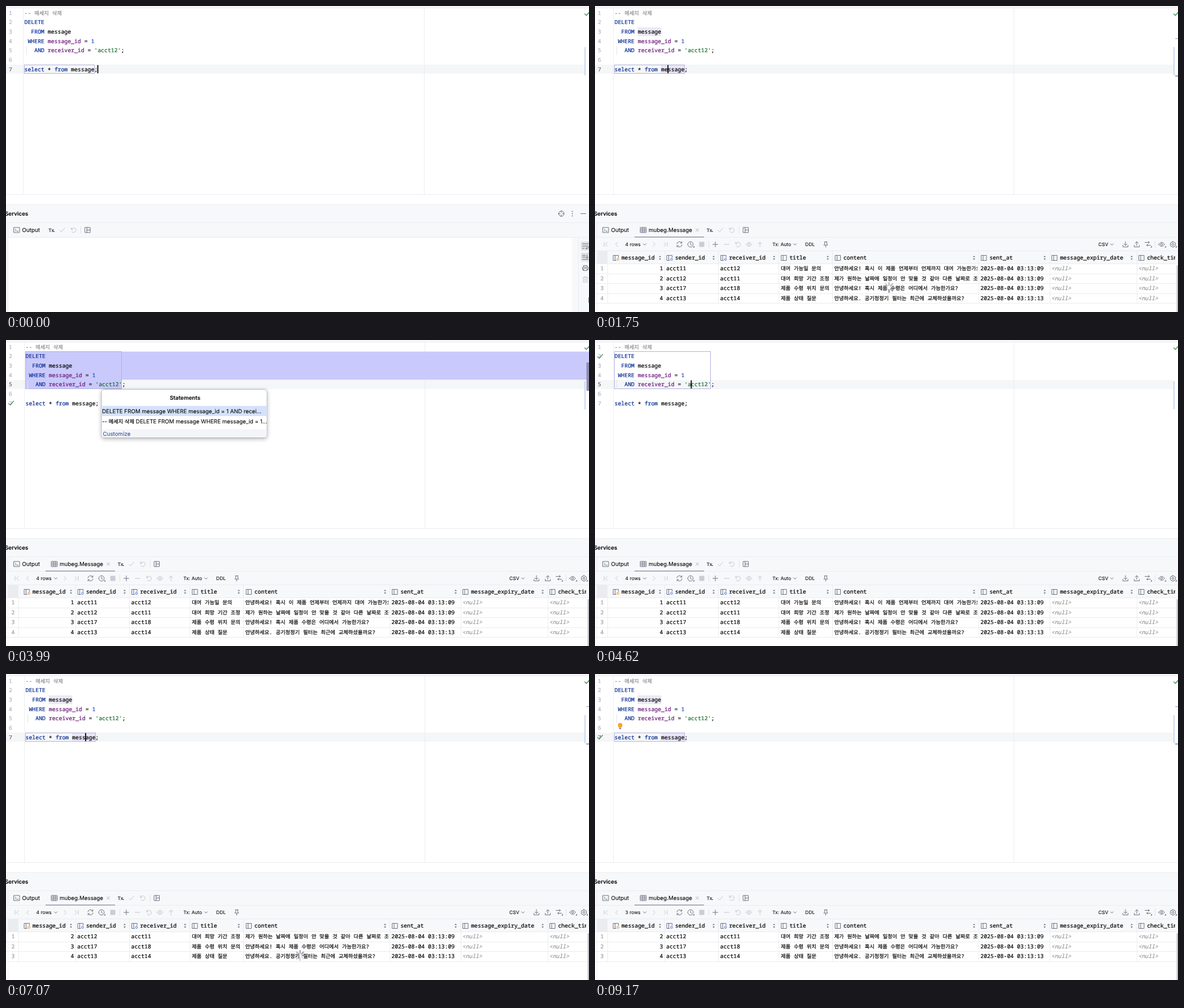
Animation, 1032 px wide and 543 px high, one loop 9590 ms. Source, as an HTML page:

```html
<!DOCTYPE html>
<html lang="ko">
<head>
<meta charset="utf-8">
<title>Query console</title>
<style>
html, body { margin: 0; width: 100%; height: 100%; overflow: hidden; background: #fff; }
svg { display: block; width: 1032px; height: 543px; }
text { font: 9.8px Inter, sans-serif; text-rendering: geometricPrecision; white-space: pre; stroke-width: .08; }
.m { font: 9.82px "Noto Sans Mono", "DejaVu Sans Mono", monospace; stroke-width: .24; }
.k { font: 9.25px "Noto Sans Mono", "Noto Sans CJK KR", "Noto Sans CJK", monospace; word-spacing: .34px; stroke-width: .22; }
.s { font-size: 8.5px; }
.b { font-weight: 600; }
.i { font-style: italic; stroke-width: .1; }
.ic { fill: none; stroke: #6c707e; stroke-width: 1; stroke-linecap: round; stroke-linejoin: round; }
.off { stroke: #c3c6cf; }
</style>
</head>
<body>
<svg id="stage" viewBox="0 0 1032 543"></svg>
<script>
const LOOP = 9590, CW = 5.892, X0 = 32.6, PITCH = 16.65;
const GRAY = '#f7f8fa', RULE = '#ebecf0', INK = '#080808';
const KEY = '#0a3095', FIELD = '#6e1a7c', STR = '#14702a', NUM = '#1a49c4';

const text = (x, y, s, cls = '', fill = INK, more = '') =>
  `<text x="${x}" y="${y}" class="${cls}" fill="${fill}" stroke="${fill}" ${more}>${s}</text>`;
const rect = (x, y, w, h, fill, more = '') =>
  `<rect x="${x}" y="${y}" width="${w}" height="${h}" fill="${fill}" ${more}/>`;
const icon = (x, y, d, cls = '', more = '') =>
  `<path class="ic ${cls}" transform="translate(${x} ${y})" d="${d}" ${more}/>`;
const group = (id, body, more = '') => `<g id="${id}" ${more}>${body}</g>`;
const ring = r => `M${-r} 0a${r} ${r} 0 1 0 ${2 * r} 0a${r} ${r} 0 1 0 ${-2 * r} 0`;
const base = n => 15.7 + (n - 1) * PITCH;
const code = (n, col, s, fill) => text(X0 + col * CW, base(n), s, 'm', fill);

const D = {
  check: 'M-4.5 0.5L-1.5 3.5L4.5 -3.5',
  undo: 'M-4 -4V-1H-1M-3.7 -1.2A4.2 4.2 0 1 1 -3 3',
  down: 'M-2.5 -1.2L0 1.3L2.5 -1.2',
  left: 'M2 -3.5L-1.5 0L2 3.5',
  right: 'M-2 -3.5L1.5 0L-2 3.5',
  plus: 'M-4.5 0H4.5M0 -4.5V4.5',
  minus: 'M-4.5 0H4.5',
  panes: 'M-4.5 -4.5H4.5V4.5H-4.5ZM-1.3 -4.5V4.5M-1.3 0H4.5',
  table: 'M-5 -4.5H5V4.5H-5ZM-5 -1.5H5M-1.7 -4.5V4.5M1.7 -4.5V4.5M-5 1.5H5',
  refresh: 'M-4.6 -.8A4.7 4.7 0 0 1 4 -2.5M4.3 -4.8V-2.2H1.8M4.6 .8A4.7 4.7 0 0 1 -4 2.5M-4.3 4.8V2.2H-1.8',
  clock: ring(4.8) + 'M0 -2.8V.3L2 1.5',
  eye: 'M-5.2 0Q0 -7.5 5.2 0Q0 7.5 -5.2 0Z' + ring(1.7),
  up: 'M0 4.5V-4M-3.5 -.8L0 -4.2L3.5 -.8',
  pin: 'M-2.5 -4.5H2.5M-1.8 -4.5V-1L-3.5 1.2H3.5L1.8 -1V-4.5M0 1.2V5',
  load: 'M0 -5V1.8M-2.8 -.8L0 1.8L2.8 -.8M-4.5 1.5V4.5H4.5V1.5',
  send: 'M0 2V-4.8M-2.8 -2L0 -4.8L2.8 -2M-4.5 1.5V4.5H4.5V1.5',
  compare: 'M-5 -3.5H3M1 -5.2L3 -3.5L1 -1.8M5 1.5H-2M0 -.2L-2 1.5L0 3.2',
  gear: ring(1.8) + 'M-1 -5H1L1.7 -3.4L3.6 -3.3L4.9 -1L4 0L4.9 1L3.6 3.3L1.7 3.4L1 5H-1L-1.7 3.4L-3.6 3.3L-4.9 1L-4 0L-4.9 -1L-3.6 -3.3L-1.7 -3.4Z',
  target: ring(4.8) + 'M0 -4.8V-2M0 4.8V2M-4.8 0H-2M4.8 0H2',
  wrap: 'M-5 -4H5M-5 0H3.5A2 2 0 0 1 3.5 4H1M2.5 2.4L1 4L2.5 5.6M-5 4H-2',
  toEnd: 'M-5 -3H0M-5 0H0M-5 4H5M3 -4V2M1 0L3 2L5 0',
  printer: 'M-3 -1.5V-4.5H3V-1.5M-3 3H-5V-1.5H5V3H3M-3 1H3V4.5H-3Z',
  trash: 'M-4.5 -3H4.5M-1.5 -3V-4.8H1.5V-3M-3.5 -3V5H3.5V-3M-1.2 -.5V2.8M1.2 -.5V2.8',
};

const keys = [0, 1, 2, 3, 4, 5, 6, 7];
const COLS = [
  ['message_id', 32, 115], ['sender_id', 127, 210], ['receiver_id', 222.5, 317], ['title', 329.5, 412],
  ['content', 425, 671], ['sent_at', 683.5, 796], ['message_expiry_date', 808.5, 950], ['check_time', 962.5, 0],
];
const ROWS = [
  [1, 'acct11', 'acct12', '대여 가능일 문의', '안녕하세요! 혹시 이 제품 언제부터 언제까지 대여 가능한가요?', '09'],
  [2, 'acct12', 'acct11', '대여 희망 기간 조정', '제가 원하는 날짜에 일정이 안 맞을 것 같아 다른 날짜로 조정', '09'],
  [3, 'acct17', 'acct18', '제품 수령 위치 문의', '안녕하세요! 혹시 제품 수령은 어디에서 가능한가요?', '09'],
  [4, 'acct13', 'acct14', '제품 상태 질문', '안녕하세요. 공기청정기 필터는 최근에 교체하셨을까요?', '13'],
];

function gridRows(list) {
  return list.map((r, i) => {
    const y = 469.4 + i * 17.4, nul = x => text(x, y, '&lt;null&gt;', 'm i', '#8c8c8c');
    return rect(0, Math.round(475 + i * 17.4), 1029, 1, RULE) +
      [22, 123, 218, 325, 420, 679, 805, 959].map(x => rect(x, 458, 1, 17.4 * (i + 1), RULE)).join('') +
      text(9.5, y, i + 1, 'm', '#9a9eaa') +
      text(120.5, y, r[0], 'm', INK, 'text-anchor="end"') +
      text(126, y, r[1], 'm') + text(221.5, y, r[2], 'm') +
      text(329, y, r[3], 'k') + text(423.5, y, r[4], 'k', INK, 'clip-path="url(#cell)"') +
      text(682.3, y, '2025-08-04 03:13:' + r[5], 'm') + nul(807.5) + nul(961.5);
  }).join('');
}

function header() {
  return COLS.map(([name, x, sort], i) => {
    const d = 'M.5 -4.5H9.5V4.5H.5ZM3.5 -4.5V4.5';
    const mark = i < 3 ? rect(x + 5.5, 446.5, 6, 6, GRAY) +
      `<circle cx="${x + 8.5}" cy="449.5" r="1.8" fill="none" stroke="${i ? '#3574f0' : '#e08b2c'}"/>` : '';
    const arrows = sort ? `<path fill="#6c707e" d="M${sort - 2} 445.5l2 -2.5l2 2.5zM${sort - 2} 448l2 2.5l2 -2.5z"/>` : '';
    return icon(x, 447, d) + mark + text(x + 14.7, 450, name, 'm', INK, 'clip-path="url(#head)"') + arrows;
  }).join('');
}

function gridBar() {
  const y = 423;
  return icon(20, y, D.left + 'M-4 -3.5V3.5', 'off') + icon(38, y, D.left, 'off') + icon(88, y, D.down) +
    icon(105, y, D.right, 'off') + icon(124, y, D.right + 'M4 -3.5V3.5', 'off') +
    icon(149.5, y, D.refresh) + icon(169, y, D.clock) + '<path d="M176 425.5v3h-3z" fill="#6c707e"/>' +
    rect(184.5, 418.5, 9, 9, '#c9ccd6', 'rx="1"') + rect(201, 417, 1, 12, '#dfe1e5') +
    icon(213, y, D.plus) + icon(233, y, D.minus, 'off') + icon(253, y, D.undo, 'off') +
    icon(272.5, y, D.eye, 'off') + icon(292, y, D.up, 'off') +
    text(314, 426, 'Tx: Auto', 's') + icon(354, y, D.down) + text(372, 426, 'DDL', 's') + icon(408.5, y, D.pin) +
    text(891, 426, 'CSV', 's') + icon(915, y, D.down) + icon(939, y, D.load) + icon(959, y, D.send) +
    icon(978.5, y, D.compare) + rect(991, 417, 1, 12, '#dfe1e5') + icon(1003, y, D.eye) + icon(1023, y, D.gear) +
    '<path d="M986 425.5v3h-3zM1011 425.5v3h-3zM1030 425.5v3h-3z" fill="#6c707e"/>';
}

function editor() {
  const guide = rect(X0 + 3.4, 71, 1, 16, '#e3e4e8');
  return rect(30, 3, 1, 331, RULE) + guide +
    code(1, 0, '--', '#8c8c8c') + text(X0 + 3 * CW, base(1), '메세지 삭제', 'k', '#8c8c8c') +
    code(2, 0, 'DELETE', KEY) + code(3, 2, 'FROM', KEY) + code(3, 7, 'message', INK) +
    code(4, 1, 'WHERE', KEY) + code(4, 7, 'message_id', FIELD) + code(4, 18, '=', INK) + code(4, 20, '1', NUM) +
    code(5, 3, 'AND', KEY) + code(5, 7, 'receiver_id', FIELD) + code(5, 19, '=', INK) +
    code(5, 21, "'acct12'", STR) + code(5, 29, ';', INK) +
    code(7, 0, 'select', KEY) + code(7.1, 7, '*', INK) + code(7, 9, 'from', KEY) + code(7, 14, 'message;', INK);
}

const kr = '-- <tspan class="k">메세지</tspan> <tspan class="k">삭제</tspan> DELETE FROM message WHERE message_id = 1...';
const popup = `<rect width="293" height="86" rx="5" fill="#fff" stroke="#b4b8c4" filter="url(#shade)"/>` +
  text(148, 18.5, 'Statements', 'b', INK, 'text-anchor="middle"') + rect(0, 29.5, 293, 18, '#d4e2fb') +
  text(1, 42, '', '', INK, 'id="pick"') + text(1, 60, kr) +
  '<path d="M.5 71H292.5V81a4.5 4.5 0 0 1 -4.5 4.5H5a4.5 4.5 0 0 1 -4.5 -4.5z" fill="#f3f5f9"/>' +
  text(2.5, 82, 'Customize', '', '#3a5490');

const bulb = '<path d="M-2 3.2C-2 1.8 -4 1 -4 -1.6A4 4 0 0 1 4 -1.6C4 1 2 1.8 2 3.2Z" fill="#f5a623"/>' +
  rect(-2, 3.8, 4, 1.5, '#6c707e', 'rx=".7"');

const spokes = keys.map(i => `<path d="M0 -4V-8.5" transform="rotate(${i * 45})" stroke="#8f939f" stroke-width="2.4" stroke-linecap="round"/>`).join('');

document.getElementById('stage').innerHTML = `
<defs>
  <clipPath id="cell"><rect x="421" y="458" width="256" height="80"/></clipPath>
  <clipPath id="head"><rect x="0" y="434" width="1027" height="24"/></clipPath>
  <filter id="shade" x="-10%" y="-20%" width="120%" height="150%">
    <feDropShadow dx="0" dy="2" stdDeviation="3.5" flood-color="#000" flood-opacity=".28"/></filter>
</defs>` +
  rect(0, 0, 1032, 543, '#fff') + rect(0, 0, 1032, 3, GRAY) + rect(0, 3, 1032, 1, RULE) +
  rect(0, 104, 1025, 16, '#f5f6f8', 'id="current"') +
  group('margin', rect(740, 4, 1, 330, RULE)) +
  keys.slice(0, 7).map(i => text(5, base(i + 1), i + 1, 'm', '#aeb3c2', `id="n${i + 1}"`)).join('') +
  group('doc',
    group('uses', rect(X0 + 7 * CW - .3, 38, 7 * CW + .6, 15.5, '#ebe9f6') +
      rect(X0 + 14 * CW - .3, 105, 7 * CW + .6, 14.5, '#e9e5f8')) +
    group('selA', rect(32.5, 104, 124, 16, '#c9c9fb')) +
    group('selB', rect(32, 20.5, 1000, 50, '#c9c9fb') + rect(32, 70, 171, 17, '#c9c9fb')) +
    rect(32.5, 104.5, 124, 15, 'none', 'id="boxA" stroke="#b2b0de"') +
    rect(32.5, 20.5, 170, 66, 'none', 'id="boxB" stroke="#b2b0de"') +
    editor() + rect(0, 0, 1.8, 14.5, '#000', 'id="caret"')) +
  group('ran', icon(9, 0, D.check, '', 'style="stroke:#559868;stroke-width:1.4"')) +
  group('bulb', bulb) +
  icon(1028.5, 13.5, 'M-4 .5L-1.2 3.3L5 -3.5', '', 'style="stroke:#3c9455;stroke-width:1.4"') +
  rect(1024.2, 73, 1.5, 50, '#b4ccf2') +
  group('ticks', rect(1027, 57, 5, 1.5, '#b9b5cd') + rect(1027, 123.5, 5, 1.5, '#8582a8')) +
  rect(1027.5, 40, 4.5, 50, '#8e8cb0', 'id="thumb"') +
  rect(0, 334, 1032, 1, RULE) + rect(0, 352, 1032, 191, GRAY) + rect(0, 352, 1032, 1, RULE) +
  rect(0, 384, 1032, 1, RULE) + rect(0, 410, 1032, 1, RULE) +
  text(-2, 372, 'Services', 'b') +
  group('tools', icon(983, 368.5, D.target) +
    [364.5, 368.5, 372.5].map(y => `<circle cx="1002.5" cy="${y}" r=".9" fill="#6c707e"/>`).join('') +
    icon(1022, 368.5, D.minus)) +
  rect(3, 385, 1, 25, RULE) + icon(19, 397.5, 'M-5 -4.5H5V4.5H-5ZM-3 -2L-1 0L-3 2M0 2H2.5') +
  text(28.5, 401, 'Output') +
  group('actions', text(75, 400.5, 'Tx', 's b', '#3c3f48') + rect(84.5, 399.5, 1.5, 1.5, '#3c3f48') +
    icon(99.5, 397.5, D.check, 'off') + icon(119.5, 397.5, D.undo, 'off') + rect(132, 391, 1, 13, '#dfe1e5') +
    icon(144.5, 397.5, D.panes)) +
  group('console', rect(4, 411, 998, 132, '#fff') + rect(3, 411, 1, 132, RULE) + rect(1013, 411, 1, 132, RULE) +
    rect(1017.5, 418, 18, 16, '#dfe1e5', 'rx="3"') + rect(1017.5, 437.5, 18, 16, '#dfe1e5', 'rx="3"') +
    icon(1025.5, 426, D.wrap) + icon(1025.5, 445.5, D.toEnd) + icon(1025.5, 465, D.printer) +
    icon(1025.5, 485, D.trash, 'off')) +
  group('grid', rect(70, 409, 123, 2, '#a8adbd') + icon(85.5, 397.5, D.table) +
    text(95, 401, 'mubeg.Message') + icon(181, 397.5, 'M-2.5 -2.5L2.5 2.5M2.5 -2.5L-2.5 2.5', '', 'style="stroke:#a8adbd"') +
    gridBar() + text(53.5, 426, '', 's', INK, 'id="count"') +
    rect(0, 434, 1032, 1, RULE) + rect(4, 435, 18, 23, '#ebecf0') +
    [123, 218, 325, 420, 679, 805, 959].map(x => rect(x, 435, 1, 23, RULE)).join('') + header() +
    rect(0, 458, 1032, 85, '#fff') + rect(0, 457, 1032, 1, RULE) + rect(3, 435, 1, 108, '#f0f1f4') +
    group('four', gridRows(ROWS)) + group('three', gridRows(ROWS.slice(1))) +
    rect(1029.5, 460, 2.5, 83, '#c4c6cc') + group('spin', spokes)) +
  group('popup', popup) +
  group('mouse', `<circle id="press" r="12.3" fill="#fff" fill-opacity=".4" stroke="#111" stroke-width="1.6"/>` +
    group('beam', ['stroke="#fff" stroke-width="2.4"', 'stroke="#222" stroke-width="1.1"']
      .map(a => `<path d="M-2.5 -5.5Q0 -5.5 0 -4Q0 -5.5 2.5 -5.5M0 -4V4M-2.5 5.5Q0 5.5 0 4Q0 5.5 2.5 5.5" fill="none" ${a}/>`).join('')) +
    group('arrow', '<path d="M0 0V12L2.8 9.5L4.7 13.5L6.5 12.6L4.7 8.8H8.5Z" fill="#111" stroke="#fff" stroke-width=".9"/>'));

const $ = id => document.getElementById(id);
const show = (id, on) => { $(id).style.display = on ? '' : 'none'; };
const move = (id, x, y) => $(id).setAttribute('transform', `translate(${x} ${y})`);
const within = (t, ...spans) => spans.some(([a, b]) => t >= a && t < b);

// start, end, from, to, hidden at
const TRIPS = [
  [0, 560, [1031, 516], [126, 112], 1260],
  [2380, 2860, [128, 112], [168, 84], 3920],
  [5250, 5460, [163, 88], [143, 111], 6580],
  [8120, 8400, [143, 111], [420, 500], 8400],
];

function drawMouse(t) {
  const trip = TRIPS.find(([a, , , , end]) => t >= a && t < end);
  show('mouse', trip);
  if (!trip) return 0;
  const [a, b, p, q] = trip, u = Math.min(1, (t - a) / (b - a)), e = u * u * (3 - 2 * u);
  const x = p[0] + (q[0] - p[0]) * e, y = p[1] + (q[1] - p[1]) * e;
  move('mouse', x, y);
  show('arrow', y > 334);
  show('beam', y <= 334);
  show('press', within(t, [560, 700], [2870, 3010], [5600, 5740]));
  return y;
}

function draw(t) {
  const y = drawMouse(t);
  const loaded = t >= 1680, line = within(t, [3010, 5600]) ? 5 : 7;
  const popA = within(t, [1260, 1610]), popB = within(t, [3920, 4550]), popC = within(t, [6580, 7000]);
  const uses = within(t, [700, 3080], [5740, LOOP]), boxB = within(t, [3430, 6090]);

  move('doc', loaded ? 2 : 0, 0);
  move('margin', loaded ? 1 : 0, 0);
  $('current').setAttribute('y', line === 5 ? 71 : 104);
  for (const n of [5, 7]) {
    const ink = n === line ? '#5f6473' : '#aeb3c2';
    $('n' + n).setAttribute('fill', ink);
    $('n' + n).setAttribute('stroke', ink);
  }
  show('uses', uses);
  show('ticks', uses);
  show('selA', popA || popC);
  show('selB', popB);
  show('thumb', popB);
  show('boxA', !boxB);
  show('boxB', boxB);

  const col = t < 630 ? 22 : t < 3010 ? 16 : t < 5600 ? 23 : 18;
  move('caret', X0 + col * CW - .6, line === 5 ? 71.5 : 104.8);
  show('caret', !(popA || popB || popC) && !within(t, [2240, 2730], [5250, 5600], [8120, 8610], [9170, LOOP]));

  const ranTwo = within(t, [4620, 7000]);
  show('ran', ranTwo || within(t, [1820, 4620], [7140, LOOP]));
  move('ran', 0, ranTwo ? 29 : 112);
  show('bulb', within(t, [2660, 3010], [5320, 5600], [7910, LOOP]));
  move('bulb', 44.5, line === 5 ? 59.5 : 92.5);

  show('popup', popA || popB || popC);
  move('popup', popA ? 126 : popB ? 169 : 141, popB ? 87.5 : 120.5);
  $('pick').textContent = popB ? 'DELETE FROM message WHERE message_id = 1 AND recei...' : 'select * from message';

  show('tools', y > 352 || within(t, [8330, 8680]));
  show('console', !loaded);
  show('grid', loaded);
  move('actions', loaded ? 122.5 : 0, 0);
  show('four', t < 7070);
  show('three', t >= 7070);
  $('count').textContent = (t < 7140 ? 4 : 3) + ' rows';

  show('spin', within(t, [1750, 2400], [7070, 7700]));
  move('spin', 520.5, 499.5);
  const step = Math.floor(t / 140);
  [...$('spin').children].forEach((s, i) => s.setAttribute('opacity', 1 - ((step - i) % 8 + 8) % 8 * .1));
}

function tick(now) {
  draw(now % LOOP);
  requestAnimationFrame(tick);
}
draw(0);
requestAnimationFrame(tick);
</script>
</body>
</html>
```
